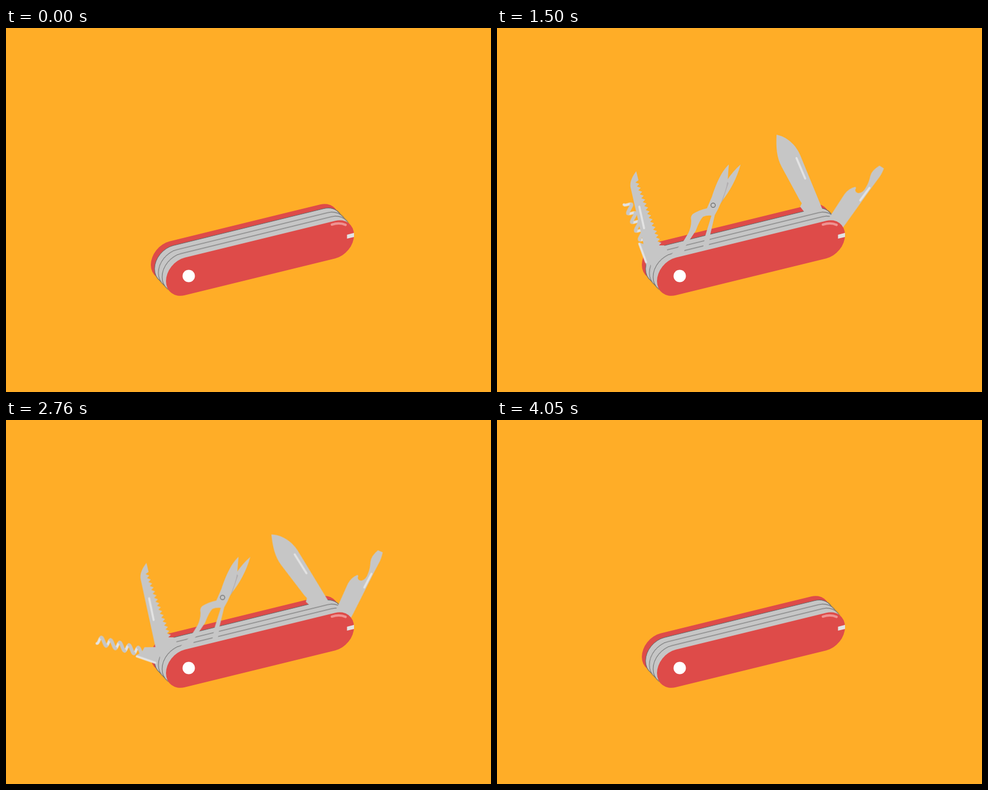
These frames come from a looping animation (864 by 648 pixels, 4080 ms). An HTML page:

```html
<!DOCTYPE html>
<html lang="en">
<head>
<meta charset="utf-8">
<title>Pocket knife</title>
<style>
  html, body { margin: 0; width: 100%; height: 100%; overflow: hidden; background: #ffad27; }
  svg { display: block; width: 100%; height: 100%; }

  .red { fill: #de4b49; }
  .layer { fill: #c6c6c6; stroke: #666; stroke-width: 1; }
  .tool { fill: #c6c6c6; animation: 4080ms infinite cubic-bezier(.333, 0, .667, 1); }
  .shine { fill: none; stroke: #e3e3e3; stroke-width: 3.6; stroke-linecap: round; }

  /* --closed is the angle of the folded tool, measured from its open pose */
  #blade     { --closed: -82deg;  transform-origin: 573px 358px; animation-name: blade; }
  #opener    { --closed: -158deg; transform-origin: 587.4px 359px; animation-name: opener; }
  #saw       { --closed: 90deg;   transform-origin: 301px 445px; animation-name: left-pair; }
  #scissors  { --closed: 49deg;   transform-origin: 311px 437px; animation-name: left-pair; }
  #corkscrew { --closed: 150deg;  transform-origin: 282px 424px; animation-name: corkscrew; }

  @keyframes blade {
    0%, .735%, 81.99%, 100% { transform: rotate(var(--closed)); }
    20.83%, 63.97% { transform: rotate(0deg); }
  }
  @keyframes opener {
    0%, 2.206%, 81.99%, 100% { transform: rotate(var(--closed)); }
    42.4%, 63.97% { transform: rotate(0deg); }
  }
  @keyframes left-pair {
    0%, .735%, 88.97%, 100% { transform: rotate(var(--closed)); }
    20.59%, 66.54% { transform: rotate(0deg); }
  }
  @keyframes corkscrew {
    0%, 2.206%, 88.97%, 100% { transform: rotate(var(--closed)); }
    58.82%, 67.28% { transform: rotate(-1deg); }
  }
</style>
</head>
<body>
<svg viewBox="0 0 864 648">
  <defs>
    <rect id="plate" x="285" y="486.9" width="335" height="67" rx="33.5" transform="matrix(1 -.245 0 1 0 0)"/>
  </defs>

  <use href="#plate" class="red" transform="translate(-27 -29)"/>
  <use href="#plate" class="layer" transform="translate(-20.3 -21.7)"/>

  <g id="blade" class="tool">
    <path d="M498 190C515 193 532 207 540 226L579 321L590 345L560 362L547 327L540 318L543 312L539 306L507 247C498 230 497 212 498 190Z"/>
    <path class="shine" d="M533.5 231.5L549 268"/>
  </g>

  <g id="corkscrew" class="tool">
    <g transform="translate(282 424) rotate(196.07)" fill="none" stroke-linecap="round">
      <path id="coil-back" stroke="#e3e3e3" stroke-width="4.8"/>
      <path id="coil-front" stroke="#c6c6c6" stroke-width="6.2"/>
    </g>
    <path d="M232 418L242 413L247 404L270 404L290 420L280 440L266 433Z"/>
    <path class="shine" d="M233 420L266 432"/>
  </g>

  <use href="#plate" class="layer" transform="translate(-13.5 -14.5)"/>

  <g id="saw" class="tool">
    <path id="saw-body"/>
    <path class="shine" d="M253.5 318L262 356.5"/>
  </g>

  <use href="#plate" class="layer" transform="translate(-6.8 -7.3)"/>

  <g id="opener" class="tool">
    <path d="M590 365L588 343L598 335L628 301Q637 292 649 291Q651 293 648 296Q647 301 653 303Q662 303 668 294Q674 287 678 276Q682 266 697 260L704 266Q698 277 690 284L678 296L621 355L600 375Z"/>
    <path class="shine" d="M654 316L673.5 296.5"/>
  </g>

  <g id="scissors" class="tool">
    <path d="M434 243Q421 254 409 272L392 318L400 309Q424 279 434 243Z"/>
    <path d="M410 274L412.5 276L402 307L394 318Z" fill="#b1adaf"/>
    <path d="M413 243C398 257 389 282 383 300L374 321Q360 324 349 331Q344 335 346 343Q346 354 341 365L330 383L306 408V440L326 425L336 388L344 376L354 361Q361 342 367 336Q374 333 382 334L371 370L367 392L377 390L380 367L388 333L394 322Q408 292 411 270Z"/>
    <circle cx="385" cy="315.5" r="3.9" stroke="#666" stroke-width="1.2"/>
  </g>

  <use href="#plate" class="red"/>
  <path d="M580.5 350Q594 345.5 605 350.5" fill="none" stroke="#ef9392" stroke-width="4.2" stroke-linecap="round"/>
  <path d="M607.5 368L620 364.8V372L607.5 375Z" fill="#e3e3e3"/>
  <circle cx="325.5" cy="441.5" r="11" fill="#fff"/>
</svg>
<script>
  const setPath = (id, d) => document.getElementById(id).setAttribute("d", d);

  function sawOutline() {
    const count = 16, stepX = 42 / count, stepY = 112 / count;
    let d = "M248 255L252 271L246.5 275";
    for (let i = 0; i < count; i++) {
      const x = 246.5 + i * stepX, y = 275 + i * stepY;
      d += `L${x + 7} ${y + stepY * .35}L${x + stepX} ${y + stepY}`;
    }
    return d + "L298 387L303 395L310 425L285 445L266 406L238 284C236 275 241 264 248 255Z";
  }

  // Half turns of a slanted sine wave; parity picks the near or far side.
  function coil(parity) {
    const halfTurn = 8.5;
    let d = "";
    for (let turn = parity; turn < 9; turn += 2) {
      for (let i = 0; i <= 8; i++) {
        const phase = turn + i / 8;
        const y = 6.2 * Math.cos(phase * Math.PI);
        const x = 116 - phase * halfTurn + .3 * y;
        d += `${i ? "L" : "M"}${x.toFixed(2)} ${y.toFixed(2)}`;
      }
    }
    return d;
  }

  setPath("saw-body", sawOutline());
  setPath("coil-front", coil(0));
  setPath("coil-back", coil(-1));
</script>
</body>
</html>
```
